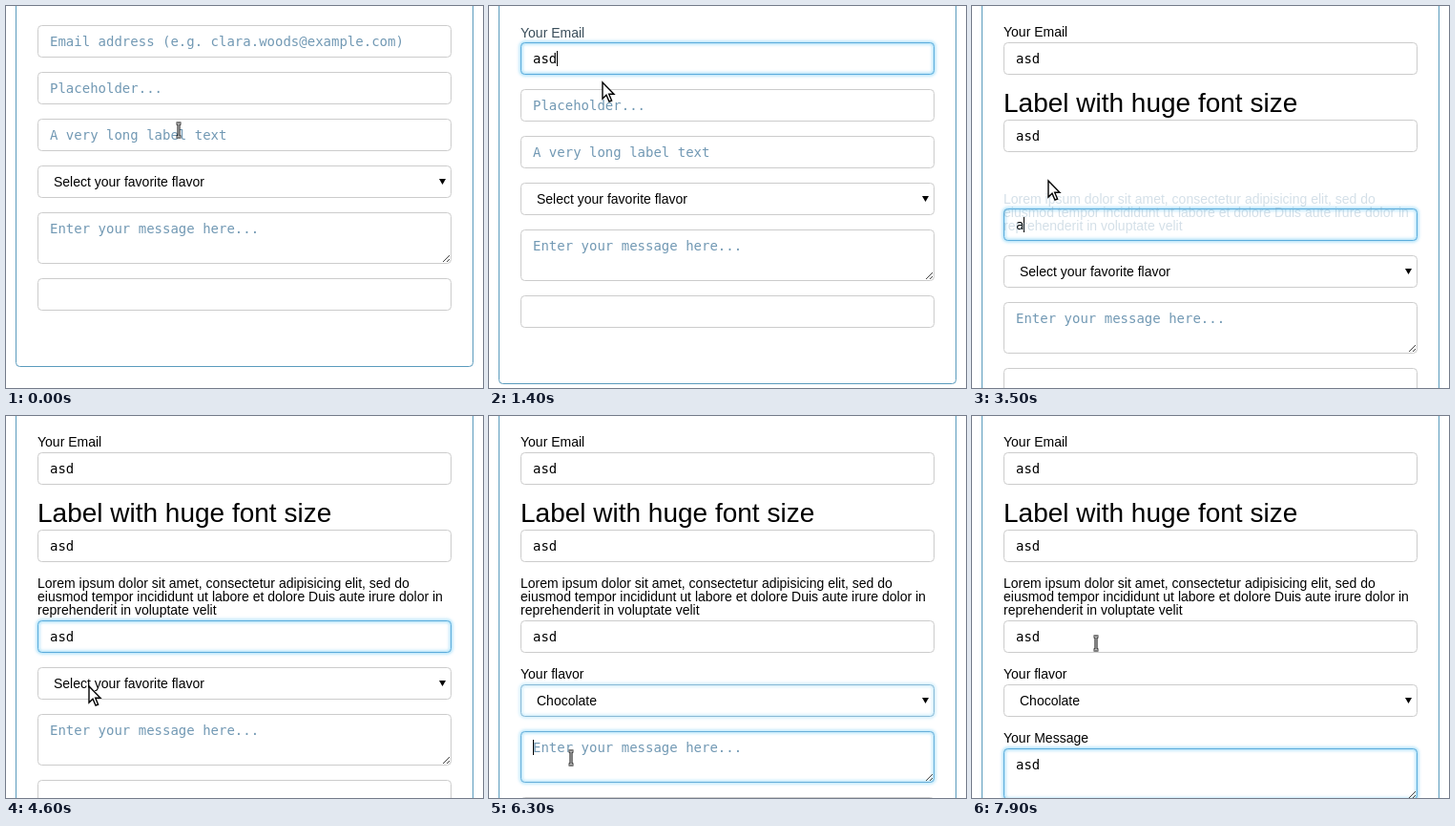
An HTML page that plays this animation: 500 by 400 pixels, repeating every 8 s.

```html
<!DOCTYPE html>
<html lang="en">
<head>
<meta charset="utf-8">
<title>Floating form labels</title>
<style>
  html, body { margin: 0; width: 100%; height: 100%; overflow: hidden; background: #fff; }
  svg { display: block; width: 500px; height: 400px; }
  text { white-space: pre; }
  .sans { font: 14px "Liberation Sans", Arial, sans-serif; }
  .mono { font: 14px "DejaVu Sans Mono", monospace; }
</style>
</head>
<body>
<svg id="stage" viewBox="0 0 500 400">
  <defs>
    <filter id="blur" filterUnits="userSpaceOnUse" x="20" y="-20" width="460" height="100">
      <feGaussianBlur stdDeviation="1.8"/>
    </filter>
  </defs>
</svg>
<script>
const LOOP = 8000, STEP = 100, CHAR = 8.43;
const BLUE = [114, 153, 180], GREY = [204, 204, 204], FOCUS = [92, 172, 220], BLACK = [0, 0, 0];

// on/off: focus span, keys: times of typed letters, size: label font size
const fields = [
  { hint: "Email address (e.g. clara.woods@example.com)", label: ["Your Email"],
    on: 700, off: 1750, keys: [1000, 1200, 1300] },
  { hint: "Placeholder...", label: ["Label with huge font size"], size: 28,
    on: 1750, off: 2850, keys: [2000, 2100, 2200] },
  { hint: "A very long label text", label: [
      "Lorem ipsum dolor sit amet, consectetur adipisicing elit, sed do",
      "eiusmod tempor incididunt ut labore et dolore Duis aute irure dolor in",
      "reprehenderit in voluptate velit"],
    on: 2850, off: 4820, keys: [3400, 3600, 3700] },
  { kind: "select", hint: "Select your favorite flavor", value: "Chocolate", label: ["Your flavor"],
    on: 4820, off: 6220, keys: [5500] },
  { kind: "area", hint: "Enter your message here...", label: ["Your Message"],
    on: 6220, off: 1e9, keys: [6700, 6900, 7100] },
  { hint: "", label: [], on: 1e9, off: 1e9, keys: [] }
];

const pointerPath = [
  [0, 181, 130], [100, 176, 122], [600, 121, 44], [1000, 119, 44], [1400, 119, 80],
  [1700, 112, 104], [1900, 108, 108], [2300, 100, 141], [2750, 80, 183], [3800, 80, 183],
  [4500, 87, 283], [5600, 87, 283], [6150, 86, 358], [7300, 86, 358], [7850, 130, 238]
];

const stage = document.getElementById("stage");
const clamp = v => Math.max(0, Math.min(1, v));
const ease = v => 1 - (1 - clamp(v)) ** 3;
const mix = (a, b, k) => `rgb(${a.map((v, i) => Math.round(v + (b[i] - v) * k))})`;

function make(tag, attrs, parent = stage) {
  const el = document.createElementNS("http://www.w3.org/2000/svg", tag);
  set(el, attrs);
  parent.appendChild(el);
  return el;
}

function set(el, attrs) {
  for (const key in attrs) el.setAttribute(key, attrs[key]);
}

// Linear interpolation over rows of [time, ...values]
function track(rows, t) {
  const i = rows.findIndex(row => row[0] > t);
  if (i < 0) return rows[rows.length - 1].slice(1);
  if (i === 0) return rows[0].slice(1);
  const a = rows[i - 1], b = rows[i], k = (t - a[0]) / (b[0] - a[0]);
  return a.slice(1).map((v, j) => v + (b[j + 1] - v) * k);
}

const panel = make("rect", { x: 10.5, y: -20, width: 479, rx: 4, fill: "none", stroke: "#5a9bbd" });

for (const f of fields) {
  f.height = f.kind === "area" ? 54 : 34;
  f.size = f.size || 14;
  f.space = f.label.length * f.size + 4;
  f.group = make("g", {});
  const box = { x: 33.5, y: 0.5, width: 433, height: f.height - 1, rx: 4, fill: "none" };
  f.glow = make("rect", { ...box, stroke: "#7fd0f5", "stroke-width": 4, filter: "url(#blur)" }, f.group);
  f.box = make("rect", box, f.group);
  const select = f.kind === "select";
  f.text = make("text", { x: select ? 50 : 46, y: 22, class: select ? "sans" : "mono" }, f.group);
  f.caret = make("rect", { y: 9, width: 1, height: 16 }, f.group);
  if (select) make("path", { d: "M454 14h7l-3.5 6z" }, f.group);
  if (f.kind === "area")
    make("path", { d: "M458 52l7-7M462 52l3-3", stroke: "#444", fill: "none" }, f.group);
}

for (const f of fields) {
  f.caption = make("g", { class: "sans" });
  f.label.forEach((line, i) => {
    const y = Math.round(f.size * (i + 0.5) + f.size * 0.3465);
    make("text", { x: 33, y, style: `font-size:${f.size}px` }, f.caption).textContent = line;
  });
}

const arrow = make("path", {
  d: "M0 0V17L4 13.2L7 20L9.6 19L6.7 12.3H12Z",
  fill: "#fff", stroke: "#000", "stroke-width": 1.4
});
const beam = make("g", { fill: "none" });
const beamShape = "M-2.5 -7H2.5M0 -7V7M-2.5 7H2.5";
make("path", { d: beamShape, stroke: "#000", "stroke-width": 3 }, beam);
make("path", { d: beamShape, stroke: "#fff", "stroke-width": 1 }, beam);

function drawField(f, top, t) {
  const age = t - (f.keys[0] ?? 1e9);
  const y = top + Math.round(f.space * ease(age / 150)) * (age >= 0);
  const glow = ease((t - f.on) / 150) * (1 - clamp((t - f.off) / 200));
  const typed = f.keys.filter(k => k <= t);
  const select = f.kind === "select";

  set(f.group, { transform: `translate(0 ${y})` });
  set(f.glow, { opacity: glow * 0.6 });
  set(f.box, { stroke: mix(GREY, FOCUS, glow) });

  const value = select ? f.value : "asd".slice(0, typed.length);
  f.text.textContent = typed.length ? value : f.hint;
  set(f.text, { fill: typed.length || select ? "#000" : mix(BLUE, BLACK, 0) });

  const rest = t - Math.max(f.on, ...typed);
  const blink = !select && t >= f.on && t < f.off && rest % 1000 < 500;
  set(f.caret, { x: Math.round(46 + typed.length * CHAR), opacity: blink ? 1 : 0 });

  // The label rises, overshoots and settles while it turns from blue to black
  const start = f.space - 4;
  const [lift] = track([[0, start], [100, start * 0.64], [300, -9], [400, 1], [500, 0]], age);
  const [alpha] = track([[0, 0], [100, 0.3], [300, 1]], age);
  set(f.caption, {
    transform: `translate(0 ${top + Math.round(lift)})`,
    opacity: age < 0 ? 0 : alpha,
    fill: mix(BLUE, BLACK, clamp((age - 300) / 200))
  });
  return y;
}

function draw(t) {
  const [x, y] = track(pointerPath, t).map(Math.round);
  let top = 20, overText = false;
  for (const f of fields) {
    const at = drawField(f, top, t);
    if (f.kind !== "select" && y >= at && y < at + f.height) overText = true;
    top = at + f.height + 15;
  }
  set(panel, { height: top + 63.5 });
  const place = `translate(${x} ${y})`;
  set(arrow, { transform: place, opacity: overText ? 0 : 1 });
  set(beam, { transform: place, opacity: overText ? 1 : 0 });
}

const begin = performance.now();
function tick() {
  const t = (performance.now() - begin) % LOOP;
  draw(Math.floor(t / STEP) * STEP);
  requestAnimationFrame(tick);
}
tick();
</script>
</body>
</html>
```
